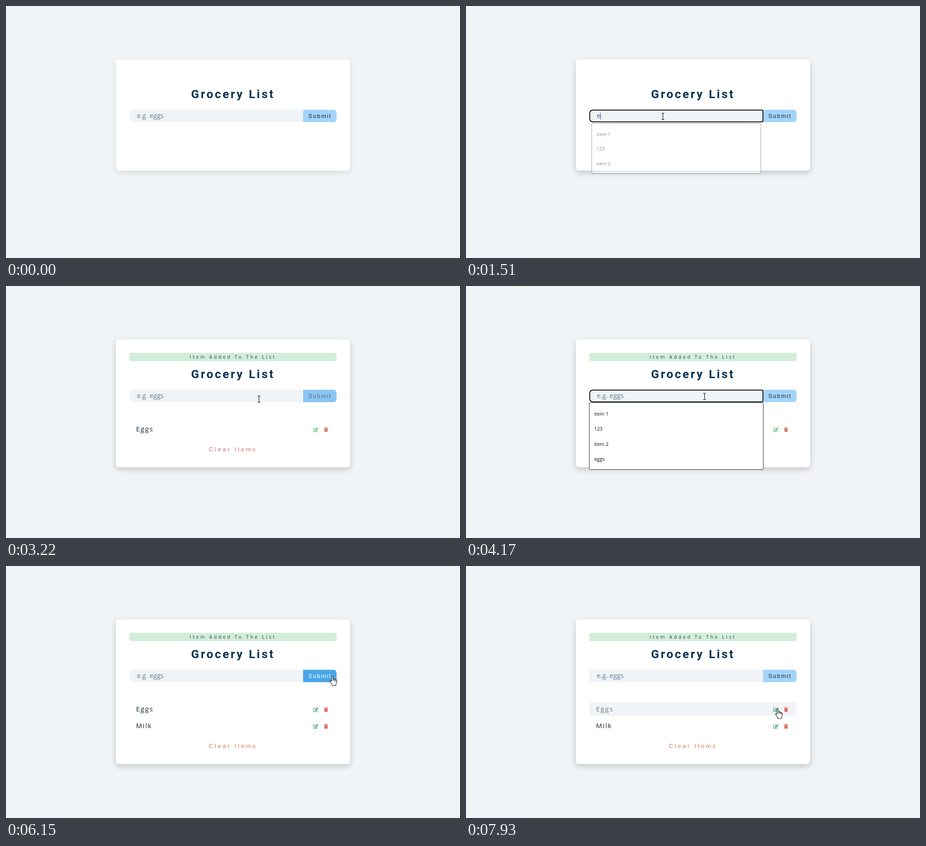
An HTML page with a canvas for the animation above (8 s loop, 1004 by 558 pixels).

```html
<!DOCTYPE html>
<html lang="en">
<head>
<meta charset="utf-8">
<title>Grocery List</title>
<style>
html, body { margin: 0; width: 100%; height: 100%; overflow: hidden; background: #f0f4f7; }
canvas { display: block; width: 1004px; height: 558px; }
</style>
</head>
<body>
<canvas id="stage"></canvas>
<script>
const LOOP = 8000, W = 1004, H = 558;
const canvas = document.getElementById('stage');
const ctx = canvas.getContext('2d');
const dpr = window.devicePixelRatio || 1;
canvas.width = W * dpr;
canvas.height = H * dpr;

const SANS = '"Open Sans", sans-serif';
const ARIAL = '"Liberation Sans", Arial, sans-serif';

// Cursor moves: start, end, target x, y, control x, y
const moves = [
  [100, 900, 435, 244, 640, 300],
  [1900, 2590, 694, 262, 570, 300],
  [2600, 2780, 695, 246, 697, 254],
  [2950, 3430, 527, 244, 610, 262],
  [5300, 5370, 547, 250, 537, 246],
  [5370, 6000, 721, 243, 640, 275],
  [6460, 7230, 733, 320, 810, 275],
  [7270, 7930, 689, 316, 712, 330]
];
// Input contents over time
const typing = [
  [900, ''], [1440, 'e'], [1650, 'eg'], [1830, 'egg'], [2100, 'eggs'], [2920, ''],
  [3640, ''], [4370, 'm'], [4780, 'mi'], [4850, 'mil'], [4980, 'milk'], [6150, '']
];
const focusSpans = [[900, 2850], [3500, 6000]];
const alertSpans = [[2920, 4880], [6150, LOOP]];
const buttonHover = [[2670, 3010], [5700, 6480]];
const popups = [
  { open: 1020, close: 1440, items: ['item 1', '123', 'item 2'] },
  { open: 3500, close: 4370, items: ['item 1', '123', 'item 2', 'eggs'] }
];
const groceries = [[2920, 'Eggs'], [6150, 'Milk']];

const clamp = v => Math.max(0, Math.min(1, v));
const ramp = (t, start, span) => clamp((t - start) / span);
const within = (t, spans) => spans.some(([a, b]) => t >= a && t < b);
const fade = (t, spans) => spans.reduce((s, [a, b]) => s + ramp(t, a, 300) - ramp(t, b, 300), 0);
const mix = (a, b, p) => `rgb(${a.map((v, i) => Math.round(v + (b[i] - v) * p))})`;

function box(x, y, w, h, r, fill) {
  ctx.beginPath();
  ctx.roundRect(x, y, w, h, r);
  if (fill) { ctx.fillStyle = fill; ctx.fill(); }
}

function text(str, x, y, font, color, spacing = 0, centred = false) {
  ctx.font = font;
  ctx.letterSpacing = spacing + 'px';
  ctx.fillStyle = color;
  ctx.fillText(str, centred ? x - ctx.measureText(str).width / 2 : x, y);
}

function cursorAt(t) {
  let x = 876, y = 540;
  for (const [start, end, tx, ty, cx, cy] of moves) {
    if (t < start) break;
    const u = ramp(t, start, end - start);
    const p = 1 - (1 - u) ** 2, q = 1 - p;
    x = q * q * x + 2 * q * p * cx + p * p * tx;
    y = q * q * y + 2 * q * p * cy + p * p * ty;
  }
  return [x, y];
}

function poly(points) {
  ctx.beginPath();
  points.forEach(([x, y]) => ctx.lineTo(x, y));
  ctx.closePath();
}

function drawBeam() {
  ctx.beginPath();
  ctx.moveTo(-3, -7); ctx.lineTo(-1, -7); ctx.lineTo(0, -6); ctx.lineTo(1, -7); ctx.lineTo(3, -7);
  ctx.moveTo(0, -6); ctx.lineTo(0, 6);
  ctx.moveTo(-3, 7); ctx.lineTo(-1, 7); ctx.lineTo(0, 6); ctx.lineTo(1, 7); ctx.lineTo(3, 7);
  ctx.stroke();
}

function drawArrow() {
  poly([[0, 0], [0, 15.5], [3.6, 12.2], [6.2, 18.3], [8.6, 17.3], [6, 11.3], [10.6, 11]]);
  ctx.fill();
  ctx.stroke();
}

function drawHand() {
  ctx.beginPath();
  ctx.moveTo(-1.6, 1.5);
  ctx.quadraticCurveTo(0, -1.4, 1.6, 1.5);
  ctx.lineTo(1.6, 6.5);
  ctx.quadraticCurveTo(3.4, 5.2, 4.6, 7.3);
  ctx.quadraticCurveTo(6.4, 6.2, 7.3, 8.2);
  ctx.quadraticCurveTo(9.3, 7.4, 9.8, 10);
  ctx.lineTo(9.8, 14);
  ctx.quadraticCurveTo(9.6, 17, 7.8, 18.8);
  ctx.lineTo(7.8, 21.5);
  ctx.lineTo(0, 21.5);
  ctx.lineTo(0, 19.2);
  ctx.lineTo(-4.6, 12.8);
  ctx.quadraticCurveTo(-5.6, 10, -3.4, 10);
  ctx.lineTo(-1.6, 12);
  ctx.closePath();
  ctx.fill();
  ctx.stroke();
  ctx.beginPath();
  for (const [x, y] of [[1.6, 6.5], [4.6, 7.3], [7.3, 8.2]]) {
    ctx.moveTo(x, y);
    ctx.lineTo(x, y + 4);
  }
  ctx.stroke();
}

function drawCursor(t) {
  if (t < 130) return;
  const [x, y] = cursorAt(t);
  const inBar = y > 230 && y < 257;
  const onIcon = x > 679 && x < 714 && y > 312 && y < 325 && t > 2920;
  ctx.save();
  ctx.translate(Math.round(x) + 0.5, Math.round(y) + 0.5);
  ctx.strokeStyle = '#111';
  ctx.fillStyle = '#fff';
  ctx.lineWidth = 1.1;
  ctx.lineJoin = 'round';
  if (onIcon || (inBar && x > 657 && x < 731)) drawHand();
  else if (inBar && x > 273 && x <= 657) drawBeam();
  else drawArrow();
  ctx.restore();
}

function drawIcons(y, late) {
  const k = 10.36 / 512;
  const at = (x, draw) => {
    ctx.save();
    ctx.translate(x, y);
    ctx.scale(k, k);
    draw();
    ctx.restore();
  };
  at(679.4, () => {
    ctx.strokeStyle = ctx.fillStyle = late ? '#58ab80' : '#66c47c';
    ctx.lineWidth = 64;
    ctx.lineJoin = ctx.lineCap = 'round';
    ctx.beginPath();
    ctx.moveTo(310, 96);
    ctx.lineTo(32, 96); ctx.lineTo(32, 480); ctx.lineTo(416, 480); ctx.lineTo(416, 330);
    ctx.stroke();
    poly([[396, 76], [500, 180], [274, 406], [158, 418], [170, 302]]);
    ctx.fill();
    poly([[418, 54], [470, 4], [510, 4], [572, 66], [572, 106], [522, 158]]);
    ctx.fill();
  });
  at(703.2, () => {
    ctx.fillStyle = late ? '#dc7065' : '#cf8272';
    box(0, 32, 448, 64, 16); ctx.fill();
    box(136, 0, 176, 50, 24); ctx.fill();
    poly([[32, 128], [416, 128], [394, 480], [360, 512], [88, 512], [54, 480]]);
    ctx.fill();
  });
}

function drawRows(t, items) {
  const late = t >= 6000;
  items.forEach(([, name], i) => {
    const top = 302 + 37 * i;
    const hover = i === 0 ? ramp(t, 7330, 300) : 0;
    if (hover) box(273, top, 458, 29.5, 5, `rgba(240,244,247,${hover})`);
    text(name, 287.4, top + 20, '14.8px ' + SANS, mix([24, 38, 54], [108, 122, 136], hover), 1.85);
    drawIcons(top + 11, late);
  });
  if (items.length) {
    text('Clear Items', 502, 328.8 + 37 * items.length, '12.95px ' + ARIAL,
      late ? '#dc7466' : '#d96f6d', 3.7, true);
  }
}

function drawForm(t) {
  const hover = fade(t, buttonHover);
  box(273, 229.7, 384, 27.5, [7, 0, 0, 7], '#f0f4f7');
  box(657, 229.7, 74, 27.5, [0, 7, 7, 0], mix([165, 212, 249], [73, 166, 233], hover));
  text('Submit', 668.6, 248, '12.95px ' + ARIAL, mix([16, 42, 66], [255, 255, 255], hover), 1.85);

  const focused = within(t, focusSpans);
  if (focused) {
    box(273.6, 230.5, 383, 26, [7, 2, 2, 7]);
    ctx.strokeStyle = '#101010';
    ctx.lineWidth = 2;
    ctx.stroke();
  }
  const [keyTime, value] = typing.filter(e => e[0] <= t).pop() || [0, ''];
  if (value) text(value, 289.4, 248, '14.8px ' + ARIAL, '#587089');
  else text('e.g. eggs', 289.2, 248, '14.8px ' + SANS, '#627f94');
  if (focused && (t - keyTime) % 1060 < 530) {
    ctx.font = '14.8px ' + ARIAL;
    ctx.letterSpacing = '0px';
    ctx.fillStyle = '#48647f';
    ctx.fillRect(Math.floor(289.4 + ctx.measureText(value).width), 236, 1, 16);
  }
}

function drawPopup(t, { open, close, items }) {
  const shown = Math.min(ramp(t, open, 140), 1 - ramp(t, close, 130));
  if (shown <= 0) return;
  const h = 14.4 + 33.4 * items.length;
  const cx = 465, cy = 258.3 + h / 2, scale = 1 - 0.052 * (1 - shown);
  ctx.save();
  ctx.globalAlpha = shown;
  ctx.translate(cx, cy);
  ctx.scale(scale, scale);
  ctx.translate(-cx, -cy);
  box(272.5, 258.3, 385, h, 3, '#fff');
  ctx.strokeStyle = '#1c2430';
  ctx.lineWidth = 1;
  ctx.stroke();
  items.forEach((item, i) => text(item, 283.4, 287 + 33.4 * i, '10.9px ' + SANS, '#111'));
  ctx.restore();
}

function draw(t) {
  ctx.setTransform(dpr, 0, 0, dpr, 0, 0);
  ctx.fillStyle = '#f0f4f7';
  ctx.fillRect(0, 0, W, H);

  const items = groceries.filter(([time]) => time <= t);
  ctx.save();
  ctx.shadowColor = `rgba(0,0,0,${0.1 + 0.1 * ramp(t, 350, 300)})`;
  ctx.shadowBlur = 13.9 * dpr;
  ctx.shadowOffsetY = 4.6 * dpr;
  box(243, 118.5, 518, 246 + 37 * items.length, 7, '#fff');
  ctx.restore();

  if (within(t, alertSpans)) {
    box(272.7, 148, 458.6, 18.5, 3.7, '#d4edda');
    text('Item Added To The List', 502, 161, '10.36px ' + SANS, '#1f4a48', 3.7, true);
  }
  text('Grocery List', 502, 204, 'bold 25.9px Roboto, sans-serif', '#063251', 3.7, true);
  drawForm(t);
  drawRows(t, items);
  popups.forEach(p => drawPopup(t, p));
  drawCursor(t);
}

const begin = performance.now();
function tick() {
  draw((performance.now() - begin) % LOOP);
  requestAnimationFrame(tick);
}
tick();
</script>
</body>
</html>
```
